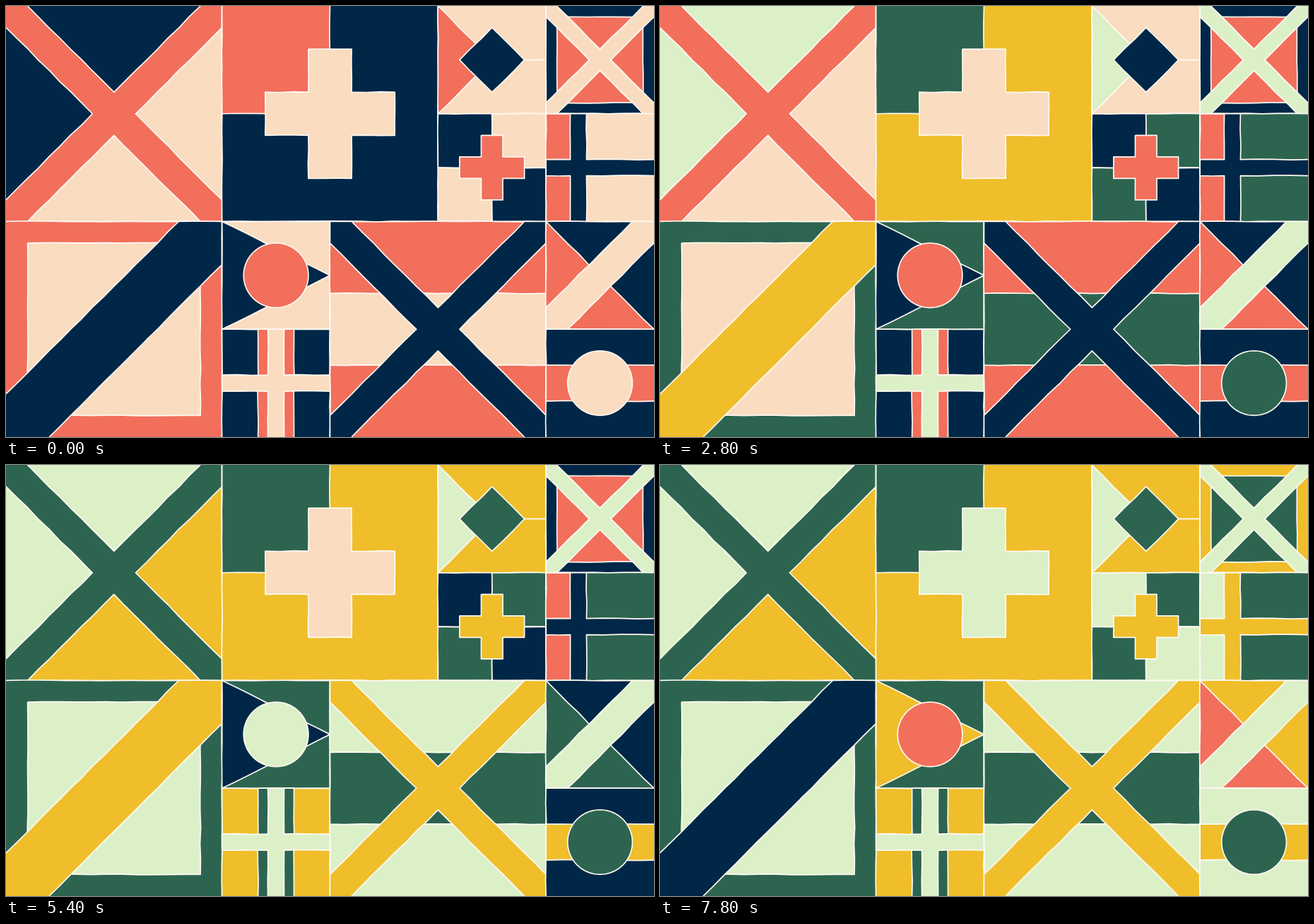
Animation, 917 px wide and 611 px high, one loop 8000 ms. Source, as an HTML page with a canvas:

```html
<!DOCTYPE html>
<html lang="en">
<head>
<meta charset="utf-8">
<title>Flag quilt</title>
<style>
html, body { margin: 0; width: 100%; height: 100%; overflow: hidden; background: #fffaf3; }
canvas { display: block; width: 917px; height: 611px; }
</style>
</head>
<body>
<canvas id="stage" width="917" height="611"></canvas>
<script>
const W = 917, H = 611, UNIT = W / 6, LOOP = 8000, STEP = 200;
const ctx = document.getElementById('stage').getContext('2d');
const INK = { n: '#002747', r: '#f26f5c', c: '#fadcc0', m: '#dcf0c8', y: '#efbe2a', g: '#2d6450' };
const LINE = '#fffaf3';

// Shapes in tile units, each a list of points
const rect = (x0, y0, x1, y1) => [[x0, y0], [x1, y0], [x1, y1], [x0, y1]];
const full = rect(0, 0, 1, 1);
const inset = rect(.1, .1, .9, .9);
const stripe = rect(0, 1 / 3, 1, 2 / 3);
const half = [[0, 0], [1, 1], [0, 1]];
const bar = [[0, .8], [.8, 0], [1, 0], [1, .2], [.2, 1], [0, 1]];
const saltire = [[0, 0], [.1, 0], [.5, .4], [.9, 0], [1, 0], [1, .1], [.6, .5], [1, .9],
  [1, 1], [.9, 1], [.5, .6], [.1, 1], [0, 1], [0, .9], [.4, .5], [0, .1]];
const disc = Array.from({ length: 72 }, (_, i) => {
  const a = i * Math.PI / 36;
  return [.5 + .3 * Math.cos(a), .5 + .3 * Math.sin(a)];
});

// Upright cross: arms between a and b, centred on cx, reaching from lo to hi
function cross(cx, w, lo, hi) {
  const a = cx - w, b = cx + w, c = .5 - w, d = .5 + w;
  return [[a, lo], [b, lo], [b, c], [hi, c], [hi, d], [b, d],
    [b, hi], [a, hi], [a, d], [lo, d], [lo, c], [a, c]];
}
const plus = cross(.5, .1, .2, .8);

// Column, row, size, starting colours, then the three layers
const tiles = {
  a: [0, 0, 2, 'ncr', [full], [[[1, 0], [1, 1], [0, 1]]], [saltire]],
  b: [2, 0, 2, 'nrc', [full], [rect(0, 0, .5, .5)], [plus]],
  c: [4, 0, 1, 'crn', [rect(0, 0, 1, .5), rect(0, .5, 1, 1)], [[[0, 0], [.5, .5], [0, 1]]],
    [[[.5, .2], [.8, .5], [.5, .8], [.2, .5]]]],
  d: [5, 0, 1, 'nrc', [full], [inset], [saltire]],
  e: [4, 1, 1, 'ncr', [rect(0, 0, .5, .5), rect(.5, .5, 1, 1)],
    [rect(.5, 0, 1, .5), rect(0, .5, .5, 1)], [plus]],
  f: [5, 1, 1, 'crn', [full], [rect(0, 0, .3, 1)], [cross(.3, .075, 0, 1)]],
  g: [0, 2, 2, 'rcn', [full], [inset], [bar]],
  h: [2, 2, 1, 'cnr', [full], [[[0, 0], [1, .5], [0, 1]]], [disc]],
  i: [2, 3, 1, 'nrc', [full], [rect(1 / 3, 0, 2 / 3, 1)], [cross(.5, .075, 0, 1)]],
  j: [3, 2, 2, 'rcn', [full], [stripe], [saltire]],
  k: [5, 2, 1, 'nrc', [full], [half], [bar]],
  l: [5, 3, 1, 'nrc', [full], [stripe], [disc]]
};

// One recolouring per step: tile, layer, new colour
const changes = ('a0m j1g b0y h0g g2y d2m ' +
  'b1g g0g f0g c1m k2m i2m e1g l2g ' +
  'a2g l1y i0y c2g j0m ' +
  'c0y h2m k1g i1g e2y ' +
  'a1y g1m j2y d0y f1m e0m h1y ' +
  'b2m f2y k0y d1g l0m ' +
  'g2n h2r k1r').split(' ');

let seed = 7;
function jitter() {
  seed = (seed * 16807) % 2147483647;
  return (seed / 2147483647 - .5) * 1.1;
}

const onBorder = (p, q) =>
  (p[0] < 1 && q[0] < 1) || (p[1] < 1 && q[1] < 1) ||
  (p[0] > W - 1 && q[0] > W - 1) || (p[1] > H - 1 && q[1] > H - 1);

// Slightly hand-drawn outline; edges along the stage border carry no line
function outline(shape, col, row, size) {
  const pts = shape.map(([x, y]) => [(col + x * size) * UNIT, (row + y * size) * H / 4]);
  const fill = new Path2D(), line = new Path2D();
  fill.moveTo(...pts[0]);
  line.moveTo(...pts[0]);
  pts.forEach((p, i) => {
    const q = pts[(i + 1) % pts.length];
    const dx = q[0] - p[0], dy = q[1] - p[1], len = Math.hypot(dx, dy);
    const border = onBorder(p, q);
    const parts = border ? 1 : Math.max(1, Math.round(len / 22));
    for (let k = 1; k <= parts; k++) {
      const off = k < parts ? jitter() : 0;
      const x = p[0] + dx * k / parts - dy / len * off;
      const y = p[1] + dy * k / parts + dx / len * off;
      fill.lineTo(x, y);
      if (border) line.moveTo(x, y);
      else line.lineTo(x, y);
    }
  });
  return { fill, line };
}

const art = Object.entries(tiles).map(([id, [col, row, size, , ...layers]]) => ({
  id,
  layers: layers.map(shapes => shapes.map(s => outline(s, col, row, size)))
}));

function coloursAt(step) {
  const now = {};
  for (const id in tiles) now[id] = [...tiles[id][3]];
  for (const [id, layer, ink] of changes.slice(0, step)) now[id][layer] = ink;
  return now;
}

function draw(step) {
  const colours = coloursAt(step);
  ctx.fillStyle = LINE;
  ctx.fillRect(0, 0, W, H);
  ctx.strokeStyle = LINE;
  ctx.lineWidth = 1.7;
  ctx.lineJoin = 'round';
  for (const { id, layers } of art) {
    layers.forEach((shapes, i) => {
      ctx.fillStyle = INK[colours[id][i]];
      for (const { fill, line } of shapes) {
        ctx.fill(fill);
        ctx.stroke(line);
      }
    });
  }
}

const start = performance.now();
let shown = -1;
function tick() {
  const step = Math.floor((performance.now() - start) % LOOP / STEP);
  if (step !== shown) draw(shown = step);
  requestAnimationFrame(tick);
}
tick();
</script>
</body>
</html>
```
